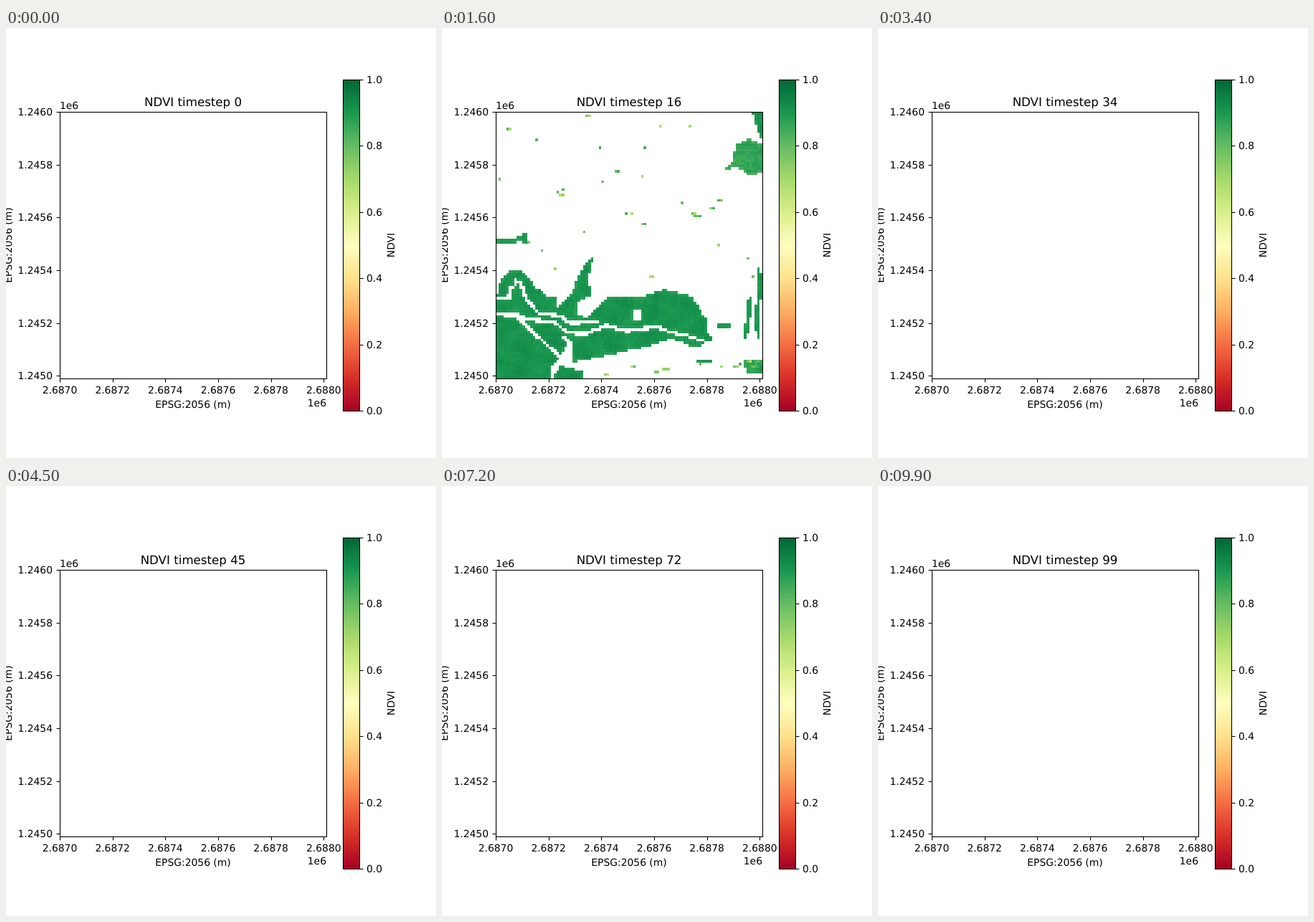
These frames come from a looping animation (600 by 600 pixels, 10000 ms). An HTML page with a canvas:

```html
<!DOCTYPE html>
<html lang="en">
<head>
<meta charset="utf-8">
<title>NDVI time series</title>
<style>
  html, body { margin: 0; width: 100%; height: 100%; overflow: hidden; background: #fff; }
  #map { position: absolute; left: 75px; top: 117px; width: 372px; height: 372px; image-rendering: pixelated; }
  svg { position: absolute; left: 0; top: 0; }
  text { font: 13.89px "DejaVu Sans", sans-serif; text-rendering: geometricPrecision; }
  #title { font-size: 16.67px; }
  .line { fill: none; stroke: #000; stroke-width: 1.11; }
</style>
</head>
<body>
<canvas id="map" width="101" height="101"></canvas>
<svg id="plot" width="600" height="600" viewBox="0 0 600 600">
  <defs><linearGradient id="ramp" x1="0" y1="1" x2="0" y2="0"></linearGradient></defs>
  <rect x="470.5" y="72.5" width="23" height="462" fill="url(#ramp)"/>
  <rect class="line" x="470.5" y="72.5" width="23" height="462"/>
  <rect class="line" x="75.5" y="117.5" width="372" height="372"/>
</svg>
<script>
const N = 101, SIZE = 372, LEFT = 75, TOP = 117;
const STEP_MS = 100, STEPS = 100;
const FIRST_PASS = 7.25, PASS_GAP = 8.75;
const ramp = ["a50026", "d73027", "f46d43", "fdae61", "fee08b", "ffffbf",
  "d9ef8b", "a6d96a", "66bd63", "1a9850", "006837"];
const rgb = ramp.map(h => [0, 2, 4].map(i => parseInt(h.slice(i, i + 2), 16)));

// Key points in stage coordinates.
const woods = [
  // western slope with its ridge
  "M75 378L82 350 96 338 112 338 128 358 147 376 162 376 160 391 180 372 195 336 215 311 " +
  "204 345 207 373 190 382 190 399 212 411 220 430 176 441 152 475 152 489 75 489",
  // central wood
  "M201 404L232 373 275 377 310 365 348 374 371 410 368 422 381 438 350 446 322 434 290 444 240 455 182 467 182 430",
  "M153 489L166 471 197 480 197 489",
  // north-east corner and grove
  "M433 117L447 117 447 156 437 135",
  "M393 197L405 188 410 163 428 154 447 164 447 200 430 207 413 195",
  "M421 463L447 463 447 481 425 482"
];
const hedges = [
  "M75 299L104 297 115 288 117 302",
  "M442 335L443 372 439 400 442 434",
  "M430 375L428 400 423 432",
  "M384 415L402 415",
  "M355 464L378 466"
];
const roads = [
  "M75 399L101 401 168 462",
  "M104 350L103 359 96 363 94 375 75 376",
  "M107 352L118 378 134 398 165 402 180 412 218 409",
  "M103 399L116 406 158 411 175 425 200 427 230 415 258 423 300 417 320 425 345 430 378 441",
  "M168 430L180 442"
];

function noise(x, y) {
  const s = Math.sin(x * 12.9898 + y * 78.233) * 43758.5453;
  return s - Math.floor(s);
}

function buildMask() {
  const g = new OffscreenCanvas(N, N).getContext("2d");
  g.scale(N / SIZE, N / SIZE);
  g.translate(-LEFT, -TOP);
  const stroke = (paths, width) => {
    g.lineWidth = width;
    paths.forEach(p => g.stroke(new Path2D(p)));
  };
  woods.forEach(p => g.fill(new Path2D(p)));
  stroke(hedges, 6);
  g.globalCompositeOperation = "destination-out";
  stroke(roads, 4.5);
  g.fillRect(267, 393, 11, 15);
  const data = g.getImageData(0, 0, N, N).data;
  const mask = Array.from({ length: N * N }, (_, i) => data[i * 4 + 3] > 127 ? 1 : 0);
  // Lone trees: mostly one cell, sometimes a short row.
  for (let i = 1; i <= 40; i++) {
    const x = Math.floor(noise(i, 1) * (N - 2));
    const y = Math.floor(i % 4 ? noise(i, 2) * 68 : 92 + noise(i, 2) * 8);
    for (let k = noise(i, 3) * 2.2; k > 0; k--) mask[y * N + x + Math.floor(k)] ||= 2;
  }
  return mask;
}

const mask = buildMask();
const bare = (x, y) => x >= 0 && y >= 0 && x < N && y < N && !mask[y * N + x];
const dip = (x, y, px, py, r) => Math.exp(-((x - px) ** 2 + (y - py) ** 2) / r ** 2);

function ndvi(x, y, late) {
  const r = noise(x, y);
  if (mask[y * N + x] === 2) return .66 + .2 * r - late * .04;
  const grove = x > 84 && y > 8 && y < 30;
  const wave = Math.sin(x * .43 + Math.sin(y * .31) * 2) * Math.sin(y * .39 + x * .11);
  let v = (grove ? .87 : .91) + .012 * wave + (grove ? .04 : .02) * (r - .5);
  if (bare(x - 1, y) || bare(x + 1, y) || bare(x, y - 1) || bare(x, y + 1)) v -= .018;
  v -= late * .012 * noise(y, x);
  v -= .3 * r * dip(x, y, 97, 94, 2.5);
  v -= late * (.25 * r * dip(x, y, 80, 83, 3) + .12 * dip(x, y, 20, 71, 2.5) + .5 * dip(x, y, 94, 85, 2));
  return v;
}

function color(v) {
  const i = Math.floor(v * 10), f = v * 10 - i;
  return rgb[i].map((c, k) => c + (rgb[i + 1][k] - c) * f);
}

// The sky is clear on regular passes only; all other steps are masked.
function isClear(step) {
  const pass = Math.ceil((step - FIRST_PASS) / PASS_GAP);
  return Math.floor(FIRST_PASS + PASS_GAP * pass) === step;
}

const map = document.getElementById("map").getContext("2d");
function drawMap(step) {
  map.clearRect(0, 0, N, N);
  if (!isClear(step)) return;
  const late = Math.max(0, Math.min(1, (step - 16) / 70));
  const img = map.createImageData(N, N);
  mask.forEach((m, i) => {
    if (m) img.data.set([...color(ndvi(i % N, Math.floor(i / N), late)), 255], i * 4);
  });
  map.putImageData(img, 0, 0);
}

const plot = document.getElementById("plot");
function add(parent, tag, attrs, text = "") {
  const el = document.createElementNS("http://www.w3.org/2000/svg", tag);
  for (const k in attrs) el.setAttribute(k, attrs[k]);
  el.textContent = text;
  return parent.appendChild(el);
}
const label = (text, x, y, anchor = "middle", more = {}) =>
  add(plot, "text", { x, y, "text-anchor": anchor, ...more }, text);
const tick = d => add(plot, "path", { class: "line", d });
const upright = (text, x, y) => label(text, 0, 0, "middle", { transform: `translate(${x} ${y}) rotate(-90)` });

ramp.forEach((h, i) => add(document.getElementById("ramp"), "stop", { offset: i / 10, "stop-color": "#" + h }));
for (let i = 0; i < 6; i++) {
  const x = 75 + i * 73.66, y = Math.round(485.3 - i * 73.66), v = Math.round(534 - i * 92.4);
  tick(`M${Math.round(x) + .5} 489.5v5`);
  tick(`M75.5 ${y + .5}h-5`);
  tick(`M493.5 ${v + .5}h5`);
  label((2.687 + i * .0002).toFixed(4), x, 510);
  label((1.245 + i * .0002).toFixed(4), 65, y + 5, "end");
  label((i / 5).toFixed(1), 503, v + 5, "start");
}
label("1e6", 75, 113, "start");
label("1e6", 447, 528, "end");
label("EPSG:2056 (m)", 261, 530);
upright("EPSG:2056 (m)", 8, 303);
upright("NDVI", 542, 303);
const title = label("", 261, 109, "middle", { id: "title" });

let shown = -1;
function show(time) {
  const step = Math.floor(time / STEP_MS) % STEPS;
  if (step === shown) return;
  shown = step;
  title.textContent = "NDVI timestep " + step;
  drawMap(step);
}
const start = performance.now();
function frame() {
  show(performance.now() - start);
  requestAnimationFrame(frame);
}
frame();
</script>
</body>
</html>
```
